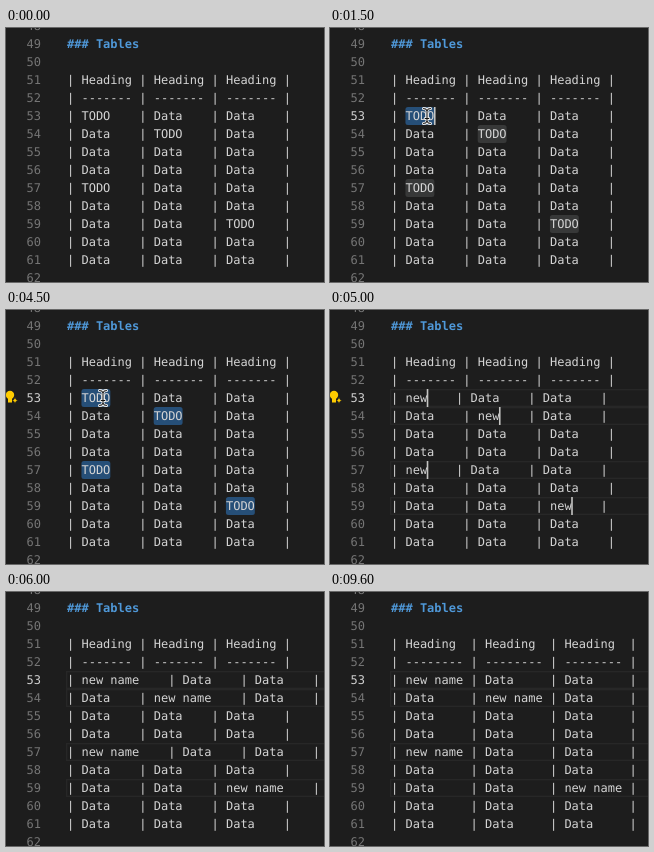
An HTML page that plays this animation: 318 by 254 pixels, repeating every 10000 ms.

```html
<!DOCTYPE html>
<html lang="en">
<head>
<meta charset="utf-8">
<title>Multi-cursor table editing</title>
<style>
  html, body { margin: 0; width: 100%; height: 100%; overflow: hidden; background: #1d1d1d; }
  svg { display: block; width: 318px; height: 254px; }
  text {
    font: 12px "DejaVu Sans Mono", "Liberation Mono", monospace;
    text-rendering: geometricPrecision;
    white-space: pre;
    fill: #d4d4d4;
  }
  .number { fill: #757575; }
  .number.active { fill: #d0d0d0; }
  .title { fill: #4f98d8; font-weight: bold; }
  .line { fill: none; stroke: #272727; stroke-width: 1.4; }
  .caret { fill: #c4c4c2; }
</style>
</head>
<body>
<svg id="editor" viewBox="0 0 318 254"></svg>
<script>
(() => {
  const LOOP = 10000;
  const LEFT = 61, CHAR = 7.224, ROW = 18;
  const FIRST = 48, LAST = 62, TABLE = 51, TABLE_END = 61, ACTIVE = 53;
  const PHRASE = 'new name';
  const SELECT = 1400, MATCH = 1500, BULB = 1700, SELECT_ALL = 2300;
  const TYPE = 4800, BULB_OFF = 5700, FORMAT = 7000;
  const MARKS = [[53, 0], [54, 1], [57, 0], [59, 2]];
  // Times at which the carets toggle, starting from visible
  const BLINKS = [2600, 3000, 3400, 3900, 4500, 4800, 6000, 6500, 7600, 8100, 8600, 9100, 9600];
  // Pointer path: time, x, y
  const PATH = [
    [400, 271, 243], [600, 226, 196], [800, 170, 140],
    [1000, 122, 98], [1200, 100, 84], [1300, 97, 88]
  ];

  const editor = document.getElementById('editor');

  function set(node, attrs) {
    for (const key in attrs) node.setAttribute(key, attrs[key]);
  }
  function add(tag, attrs, parent = editor) {
    const node = document.createElementNS('http://www.w3.org/2000/svg', tag);
    set(node, attrs);
    parent.append(node);
    return node;
  }
  const show = (node, on) => set(node, { visibility: on ? 'visible' : 'hidden' });
  const rowTop = row => 79 + (row - ACTIVE) * ROW;
  const columnLeft = n => LEFT + n * CHAR;

  const marks = MARKS.map(([row, cell]) => ({
    row, cell,
    line: add('rect', { class: 'line', x: LEFT - 0.3, y: rowTop(row) + 0.7, width: 270, height: ROW - 1.4 }),
    box: add('rect', { x: columnLeft(2 + cell * 10), y: rowTop(row), width: 4 * CHAR, height: ROW, rx: 2.5 })
  }));

  const numbers = {}, rows = {};
  for (let row = FIRST; row <= LAST; row++) {
    const y = rowTop(row) + 13.2;
    numbers[row] = add('text', { class: 'number', x: 20.5, y });
    numbers[row].textContent = row;
    rows[row] = add('text', { x: LEFT, y });
  }
  rows[49].textContent = '### Tables';
  rows[49].classList.add('title');

  for (const mark of marks) {
    mark.caret = add('rect', { class: 'caret', y: rowTop(mark.row), width: 1.6, height: ROW });
  }

  const bulb = add('g', { fill: '#fc0' });
  add('circle', { cx: 4, cy: 85, r: 4.2 }, bulb);
  add('path', { d: 'M2 88h4v4.5h-4z' }, bulb);
  add('path', {
    d: 'M9 87.2l1 2.2 2 1-2 1-1 2.2-1-2.2-2-1 2-1z',
    stroke: '#1d1d1d', 'stroke-width': 0.6
  }, bulb);

  const pointer = add('g', { fill: 'none', 'stroke-linecap': 'round' });
  for (const [stroke, width] of [['#eee', 3], ['#111', 1]]) {
    add('path', {
      d: 'M-3.5-7.5Q0-7.5 0-5Q0-7.5 3.5-7.5M0-5V5M-3.5 7.5Q0 7.5 0 5Q0 7.5 3.5 7.5M-1.8 2.5H1.8',
      stroke, 'stroke-width': width
    }, pointer);
  }

  function pointerAt(t) {
    const next = PATH.findIndex(p => p[0] > t);
    if (next < 1) return (next ? PATH[PATH.length - 1] : PATH[0]).slice(1);
    const [t0, x0, y0] = PATH[next - 1], [t1, x1, y1] = PATH[next];
    const k = (t - t0) / (t1 - t0);
    return [x0 + (x1 - x0) * k, y0 + (y1 - y0) * k];
  }

  function rowText(row, word, formatted) {
    const base = row === TABLE ? 'Heading'
      : row === TABLE + 1 ? '-'.repeat(formatted ? 8 : 7) : 'Data';
    const cells = [0, 1, 2].map(cell => {
      const marked = MARKS.some(m => m[0] === row && m[1] === cell);
      const text = marked ? word : base;
      return formatted ? text.padEnd(9) : text + ' '.repeat(8 - base.length);
    });
    return '| ' + cells.join('| ') + '|';
  }

  function render(t) {
    const typing = t >= TYPE, formatted = t >= FORMAT;
    const typed = Math.floor((t - TYPE) / 100) + 1;
    const word = typing ? PHRASE.slice(0, typed) : 'TODO';
    const caretOn = BLINKS.filter(time => time <= t).length % 2 === 0;

    for (let row = TABLE; row <= TABLE_END; row++) {
      const text = rowText(row, word, formatted);
      if (rows[row].textContent !== text) rows[row].textContent = text;
    }
    numbers[ACTIVE].classList.toggle('active', t >= SELECT);

    marks.forEach((mark, i) => {
      const selected = t >= (i ? SELECT_ALL : SELECT);
      const start = 2 + mark.cell * (formatted ? 11 : 10);
      show(mark.line, typing);
      show(mark.box, !typing && (selected || t >= MATCH));
      set(mark.box, { fill: selected ? '#264f78' : '#373838' });
      show(mark.caret, selected && caretOn);
      set(mark.caret, { x: columnLeft(start + word.length) - 0.4 });
    });

    show(bulb, t >= BULB && t < BULB_OFF);
    show(pointer, t >= PATH[0][0] && !typing);
    set(pointer, { transform: `translate(${pointerAt(Math.floor(t / 100) * 100)})` });
  }

  const begin = performance.now();
  function tick() {
    render((performance.now() - begin) % LOOP);
    requestAnimationFrame(tick);
  }
  tick();
})();
</script>
</body>
</html>
```
